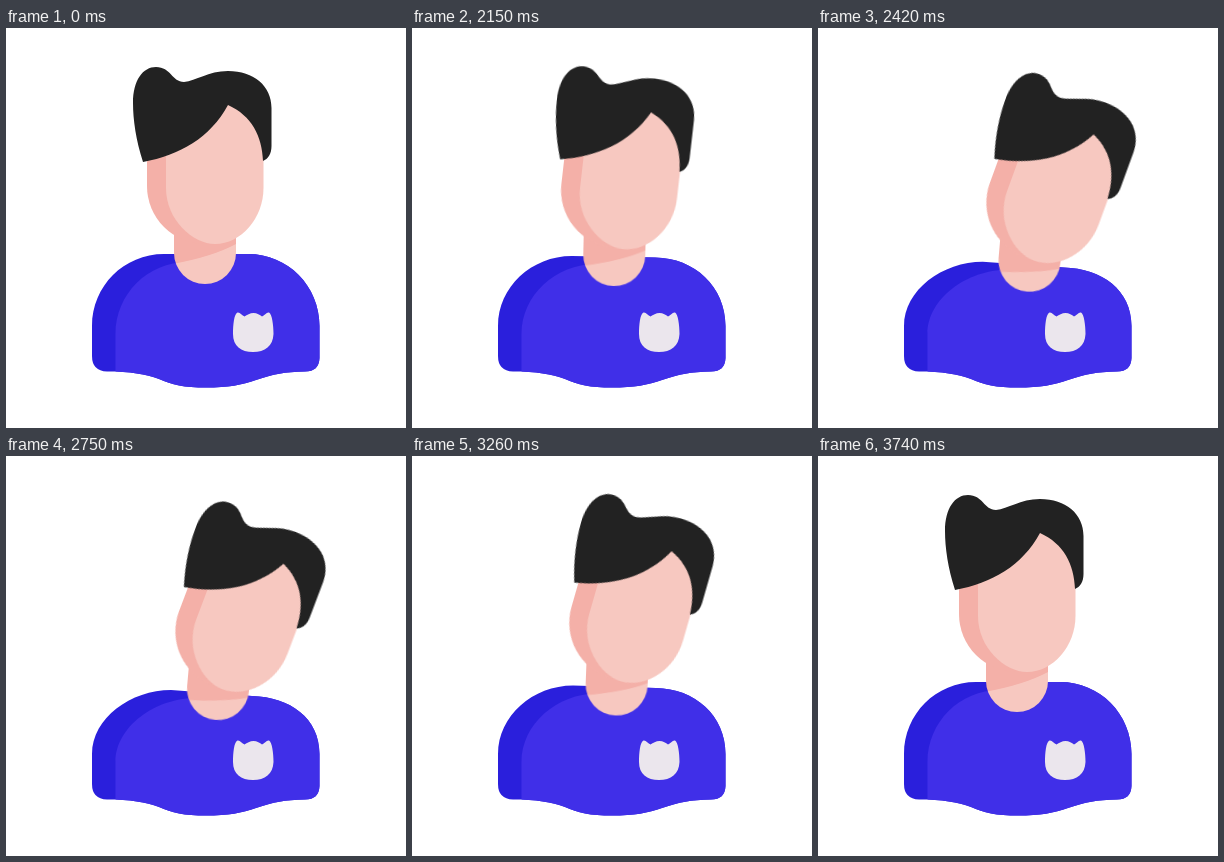
Write an HTML page that moves like this. It is 400 px wide and 400 px high and loops after 3.77 s.

```html
<!DOCTYPE html>
<html lang="en">
<head>
<meta charset="utf-8">
<title>Head tilt</title>
<style>
  html, body { margin: 0; width: 100%; height: 100%; overflow: hidden; background: #fff; }
  svg { display: block; width: 100%; height: 100%; }

  /* Everything that leans shares one clock; the head turn has its own easing. */
  .lean { animation: 3770ms cubic-bezier(.333, 0, .667, 1) infinite; }
  .neck { animation-name: neck; transform-origin: 199px 225px; }
  .head { animation-name: head; }
  .chin { animation-name: chin; }
  .torso { animation-name: torso; }
  .front { animation-name: front; }
  .turn { animation: turn 3770ms infinite; transform-origin: 192px 191px; }

  @keyframes neck {
    0%, 52.8%, 92.31%, 100% { transform: translate(0, 0) rotate(0deg); }
    65.78%, 79.58% { transform: translate(13px, 8px) rotate(5deg); }
  }
  @keyframes head {
    0%, 52.8%, 92.31%, 100% { transform: translate(0, 0); }
    65.78%, 79.58% { transform: translate(17.2px, 12.8px); }
  }
  @keyframes turn {
    0% { transform: rotate(0deg); }
    52.8% { transform: rotate(0deg); animation-timing-function: cubic-bezier(.25, 0, .63, 1); }
    65.78% { transform: rotate(20.7deg); }
    81.7% { transform: rotate(20.7deg); animation-timing-function: cubic-bezier(.35, 0, .45, 1); }
    99.2%, 100% { transform: rotate(0deg); }
  }
  @keyframes chin {
    0%, 52.8%, 92.31%, 100% { d: path("M160 180 H240 V211 L230 216 Q204 230 160 237 Z"); }
    65.78%, 79.58% { d: path("M160 180 H240 V230 L230 231 Q204 238 160 239 Z"); }
  }
  @keyframes torso {
    0%, 52.8%, 92.31%, 100% {
      d: path("M86 298 C86 258 118 226 158 226 L242 226 C282 226 313.5 258 313.5 298 V330 Q313 343.5 299 343.5 C278 344 268 346 250 352 C236 357 222 359.5 200 359.5 C178 359.5 166 357 153 351 C140 346 124 343.5 101 343.5 Q86 343 86 328 Z");
    }
    65.78%, 79.58% {
      d: path("M86 298 C86 262 125 234 165 234 L246 240 C284 241 313.5 262 313.5 298 V330 Q313 343.5 299 343.5 C278 344 268 346 250 352 C236 357 222 359.5 200 359.5 C178 359.5 166 357 153 351 C140 346 124 343.5 101 343.5 Q86 343 86 328 Z");
    }
  }
  @keyframes front {
    0%, 52.8%, 92.31%, 100% { d: path("M109.5 365 V306 C109.5 266 142 234 181.5 234 L200 215 H320 V365 Z"); }
    65.78%, 79.58% { d: path("M109.5 365 V306 C109.5 271 149 242 190 242 L213 223 H320 V365 Z"); }
  }
</style>
</head>
<body>
<svg viewBox="0 0 400 400">
  <defs>
    <clipPath id="torsoClip">
      <path class="lean torso" d="M86 298 C86 258 118 226 158 226 L242 226 C282 226 313.5 258 313.5 298 V343 L200 359 L86 343 Z"/>
    </clipPath>
    <clipPath id="neckClip">
      <path d="M168 185 V225 A31 31 0 0 0 230 225 V185 Z"/>
    </clipPath>
  </defs>

  <g clip-path="url(#torsoClip)">
    <rect x="80" y="220" width="240" height="145" fill="#2a1fdc"/>
    <path class="lean front" fill="#402fe8" d="M109.5 365 V306 C109.5 266 142 234 181.5 234 L200 215 H320 V365 Z"/>
  </g>

  <path fill="#ebe6ed" d="M231.5 284.5 C234 284 236 287.5 238.5 288.5 C241 287 244 285 247.5 285 C251 285 254 287 256 288.5 C258.5 287.5 260.5 284 263 284.5 C266 286 267.5 297 267.5 306 C267 318 259 324 247 324 C235 324 227 318 227 306 C227 297 228 286 231.5 284.5 Z"/>

  <g class="lean neck">
    <g clip-path="url(#neckClip)">
      <rect x="160" y="180" width="80" height="80" fill="#f7c8c0"/>
      <path class="lean chin" fill="#f4b0a8" d="M160 180 H240 V211 L230 216 Q204 230 160 237 Z"/>
    </g>
  </g>

  <g class="lean head">
    <g class="turn">
      <path fill="#f4b0a8" d="M141 100 V158 A58 58 0 0 0 257 158 V100 Z"/>
      <path fill="#f7c8c0" d="M160 76 V160 C160 192 187 216 209 216 C235 216 257.5 190 257.5 160 V76 Z"/>
      <path fill="#222" d="M137 134 C130 112 127 92 127 75 C127 52 137 39 150 39 C165 39 166 54 178 54 C190 53 202 43 222 43 C248 43 265.5 58 265.5 80 V118 C265.5 126 262 131 257 133 C256 108 246 88 222 77 C204 110 174 127 137 134 Z"/>
    </g>
  </g>
</svg>
</body>
</html>
```
